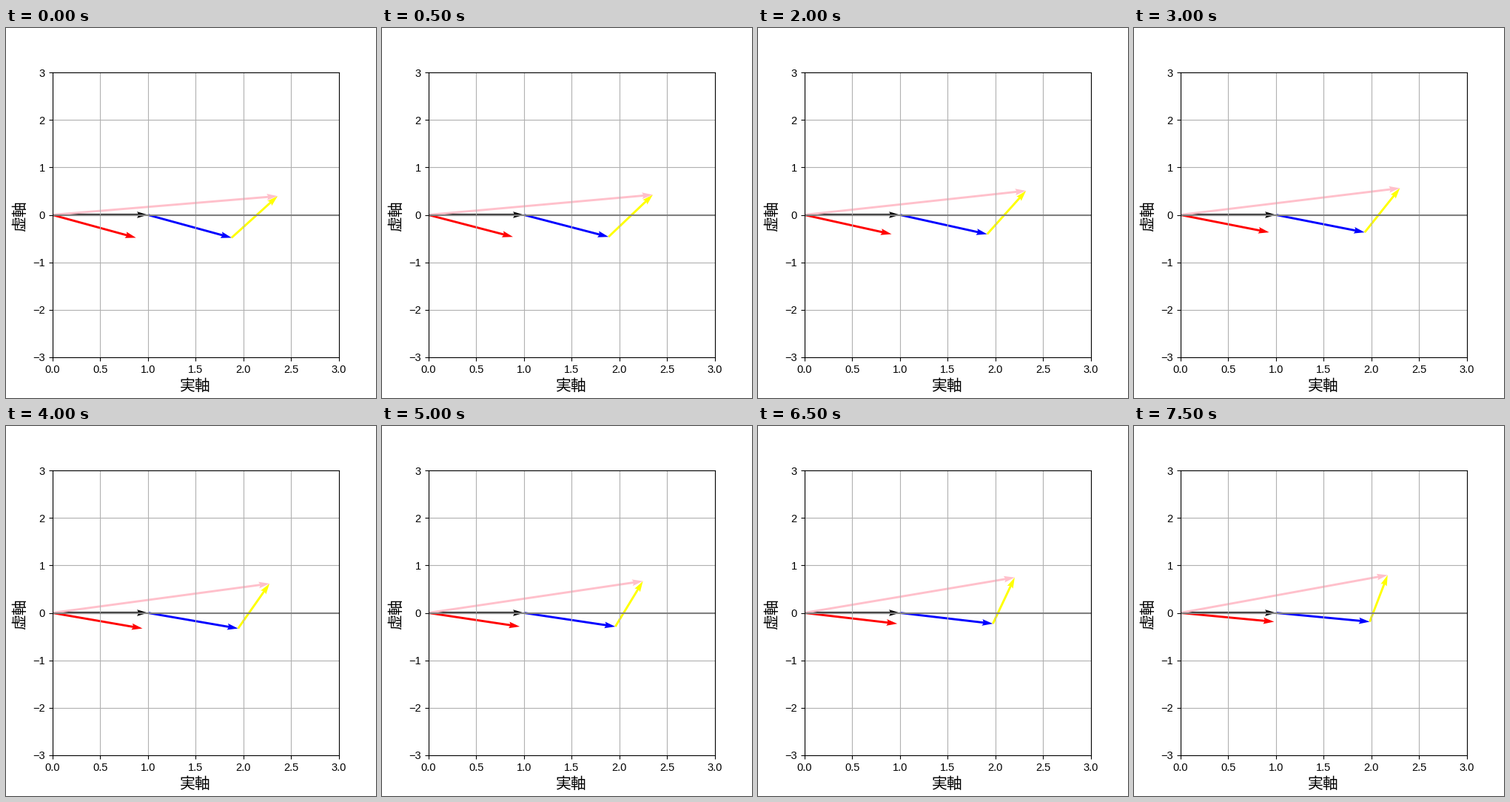
A matplotlib script that plays this animation: 500 by 500 pixels, repeating every 8 s.

```python
import numpy as np
import matplotlib.pyplot as plt
from matplotlib.animation import FuncAnimation

FRAMES = 16
STEP = np.deg2rad(1.2)
START = np.deg2rad(-28.8)
COLORS = ["black", "red", "blue", "yellow", "pink"]


def phasors(i):
    """Tails and vectors of 1, z, z, iz and their sum, as complex numbers."""
    z = np.exp(1j * (START + STEP * i))
    tails = np.array([0, 0, 1, 1 + z, 0])
    vectors = np.array([1, z, z, 1j * z, 1 + z + 1j * z])
    return tails, vectors


fig, ax = plt.subplots(figsize=(5, 5), dpi=100)
ax.set_xlim(0, 3)
ax.set_ylim(-3, 3)
ax.set_xticks(np.arange(0, 3.1, 0.5))
ax.set_yticks(range(-3, 4))
ax.grid(True)
ax.axhline(0, color="gray")
for tick in ax.get_xticklabels() + ax.get_yticklabels():
    tick.set(fontfamily="Liberation Sans", fontsize=10.5)

label = dict(fontfamily="Noto Sans CJK JP", fontsize=15, ha="center",
             va="baseline", rotation_mode="anchor")
fig.text(256 / 500, 1 - 490 / 500, "実軸", **label)
fig.text(25.5 / 500, 1 - 254.5 / 500, "虚軸", rotation=90, **label)

tails, vectors = phasors(0)
arrows = ax.quiver(tails.real, tails.imag, vectors.real, vectors.imag,
                   color=COLORS, angles="xy", scale_units="xy", scale=1)


def update(i):
    tails, vectors = phasors(i)
    arrows.set_offsets(np.column_stack([tails.real, tails.imag]))
    arrows.set_UVC(vectors.real, vectors.imag)
    return [arrows]


anim = FuncAnimation(fig, update, frames=FRAMES, interval=500,
                     repeat=True, repeat_delay=0)
plt.show()
```
